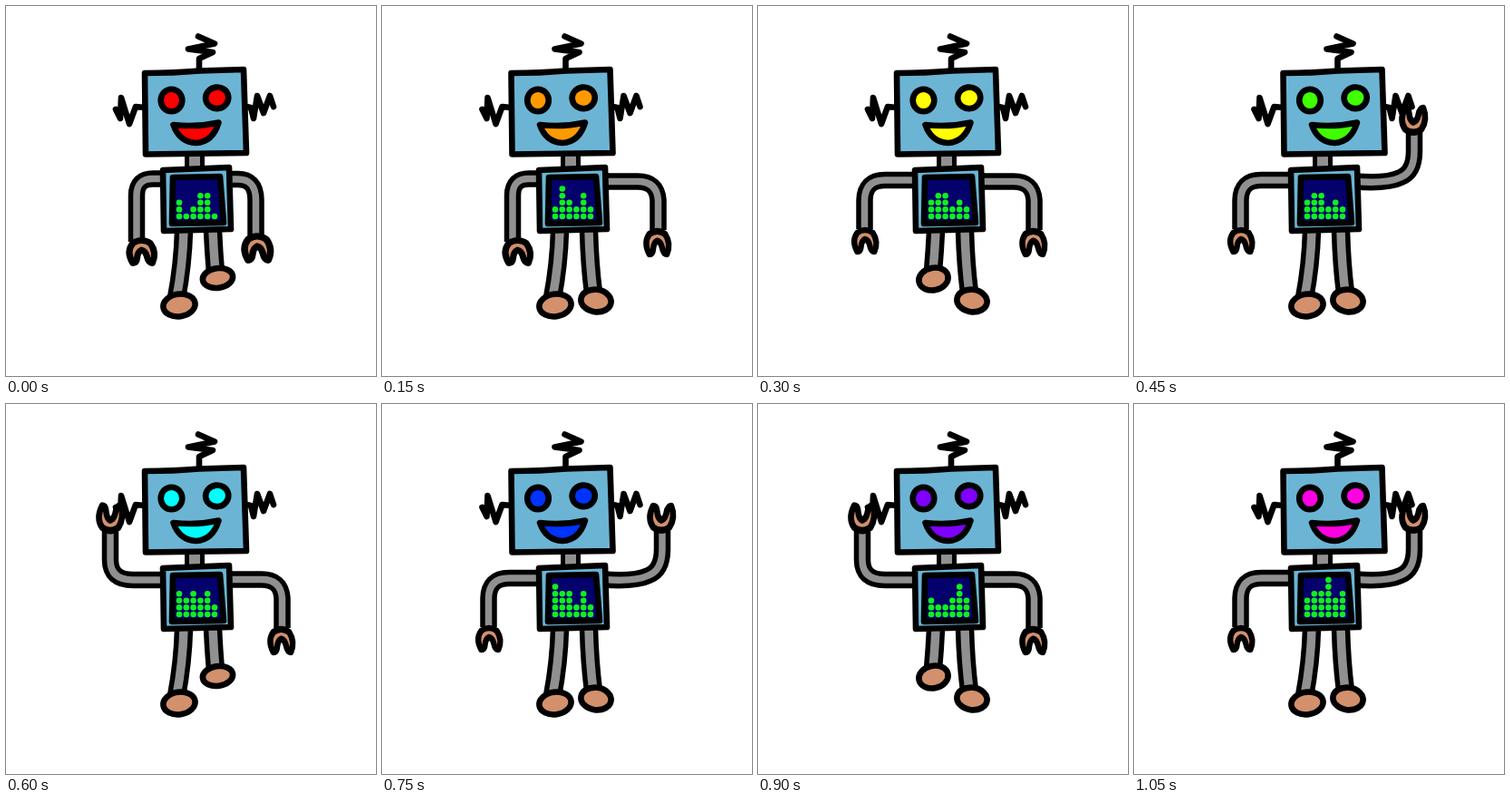
An HTML page with a canvas that plays this animation: 408 by 408 pixels, repeating every 1200 ms.

```html
<!DOCTYPE html>
<html lang="en">
<head>
<meta charset="utf-8">
<title>Dancing robot</title>
<style>
  html, body { margin: 0; width: 100%; height: 100%; overflow: hidden; background: #fff; }
  canvas { display: block; }
</style>
</head>
<body>
<canvas width="408" height="408"></canvas>
<script>
const ctx = document.querySelector('canvas').getContext('2d');
ctx.lineJoin = 'round';

const STEP = 150, INK = 6.6;
const BLUE = '#6cb4d4', GREY = '#909090', SKIN = '#d2906c', NAVY = '#04006c', DOT = '#10f01c';

// Limbs: a tube path plus a hand [x, y, scaleX, scaleY] or foot [x, y, rx, ry, tilt]
const leftArms = {
  near: { tube: 'M176 190.5 H163 Q144 190 144 209 V260', hand: [149.5, 270, 1.08, 1.04] },
  wide: { tube: 'M176 192 H140 Q118 192 117.5 214 V246', hand: [118, 258, .95, 1] },
  up: { tube: 'M176 194 H140 Q115 194 115 172 V138', hand: [115, 127, 1, -1.15] }
};
const rightArms = {
  near: { tube: 'M244 191 H254 Q275.5 190 275.5 214 V256', hand: [277, 266, 1.12, 1.1] },
  wide: { tube: 'M244 193.5 H281 Q303 193 304.5 214 V247', hand: [303.5, 260, .97, 1.06] },
  up: { tube: 'M244 193.5 Q280 196 294 189 Q309 183 309 160 V138', hand: [308, 127, 1, -1.12] }
};
const leftLegs = {
  down: { tube: 'M196 248 Q195 285 188 322', foot: [191, 330, 17.7, 12.3, -8] },
  lifted: { tube: 'M196 248 Q195 270 193 292', foot: [193.5, 301, 16.3, 12.3, -12] }
};
const rightLegs = {
  down: { tube: 'M228 248 Q229 285 233 316', foot: [236, 325, 16.7, 12.3, 8] },
  lifted: { tube: 'M228 248 Q229 270 231 294', foot: [233.5, 300, 16.7, 10.8, -8] }
};

const pose = (head, color, bars, leftArm, rightArm, leftLeg = 'down', rightLeg = 'down') =>
  ({ head, color, bars, leftArm, rightArm, leftLeg, rightLeg });

const poses = [
  pose(0, '#ff0000', [3, 1, 2, 4, 4, 1], 'near', 'near', 'down', 'lifted'),
  pose(-10.5, '#ff9900', [2, 5, 3, 2, 4, 2], 'near', 'wide'),
  pose(0, '#ffff00', [3, 4, 4, 2, 3, 2], 'wide', 'wide', 'lifted'),
  pose(11.5, '#40ff00', [3, 4, 4, 2, 3, 2], 'wide', 'up'),
  pose(0, '#00ffff', [4, 3, 4, 3, 4, 2], 'up', 'wide', 'down', 'lifted'),
  pose(-10.5, '#0033ff', [5, 4, 4, 2, 4, 2], 'wide', 'up'),
  pose(0, '#8000ff', [3, 2, 2, 3, 5, 3], 'up', 'wide', 'lifted'),
  pose(11.5, '#ff00e0', [3, 4, 4, 6, 3, 4], 'wide', 'up')
];

function line(d, width = INK, color = '#000') {
  ctx.lineWidth = width;
  ctx.strokeStyle = color;
  ctx.stroke(new Path2D(d));
}

function shape(d, fill, width = INK) {
  ctx.fillStyle = fill;
  ctx.fill(new Path2D(d));
  line(d, width);
}

function oval(x, y, rx, ry, tilt, fill) {
  ctx.beginPath();
  ctx.ellipse(x, y, rx, ry, tilt * Math.PI / 180, 0, Math.PI * 2);
  ctx.fillStyle = fill;
  ctx.fill();
  ctx.lineWidth = INK;
  ctx.strokeStyle = '#000';
  ctx.stroke();
}

function tube(d, inner) {
  ctx.lineCap = 'butt';
  line(d, inner + 11);
  line(d, inner, GREY);
  ctx.lineCap = 'round';
}

function arm(limb) {
  tube(limb.tube, 7.5);
  const [x, y, sx, sy] = limb.hand;
  ctx.save();
  ctx.translate(x, y);
  ctx.scale(sx, sy);
  shape('M-9 13 Q-16 1 -9 -8 Q0 -14 9 -8 Q16 2 11 13 Q7 13 5.5 6 Q4 0 0 -1 Q-4 1 -4.5 7 Q-5 13 -9 13Z', SKIN);
  ctx.restore();
}

function leg(limb) {
  tube(limb.tube, 9.5);
  oval(...limb.foot, SKIN);
}

function head(shift, color) {
  ctx.save();
  ctx.translate(shift, 0);
  line('M212 33.5 L230 41.5 L201 47.5 L228 51 L213 58 V70');
  line('M121 114 L126 124 L127 101 L136 130 L143 111 L153 112');
  line('M265 111 L270 112 L273 124 L277 99 L284 118 L291 99 L295 111');
  shape('M153 74 Q185 74 213 71.5 L262 70 L265 162 L154 163.5Z', BLUE);
  oval(182.5, 104, 11.8, 12.3, 0, color);
  oval(232.7, 101.3, 12.6, 11.8, -8, color);
  shape('M184.5 131 Q210 134 234.5 128.5 Q228 150 209.5 151 Q191 150 184.5 131Z', color);
  ctx.restore();
}

function body(bars) {
  shape('M173 181 L246 178 L248 246 L174 248Z', BLUE);
  shape('M184 189 L236 188 L240 239 L183 240Z', NAVY);
  ctx.fillStyle = DOT;
  bars.forEach((height, column) => {
    for (let row = 0; row < height; row++) {
      ctx.beginPath();
      ctx.arc(191 + column * 7.8, 232 - row * 7.6, 3.3, 0, Math.PI * 2);
      ctx.fill();
    }
  });
}

function draw(now) {
  const p = poses[Math.floor(now / STEP) % poses.length];
  ctx.fillStyle = '#fff';
  ctx.fillRect(0, 0, 408, 408);
  ctx.lineCap = 'round';
  shape('M199.5 162 V180 H216.5 V162Z', GREY, 5);
  head(p.head, p.color);
  leg(leftLegs[p.leftLeg]);
  leg(rightLegs[p.rightLeg]);
  arm(leftArms[p.leftArm]);
  arm(rightArms[p.rightArm]);
  body(p.bars);
}

const start = performance.now();
function tick() {
  draw(performance.now() - start);
  requestAnimationFrame(tick);
}
tick();
</script>
</body>
</html>
```
